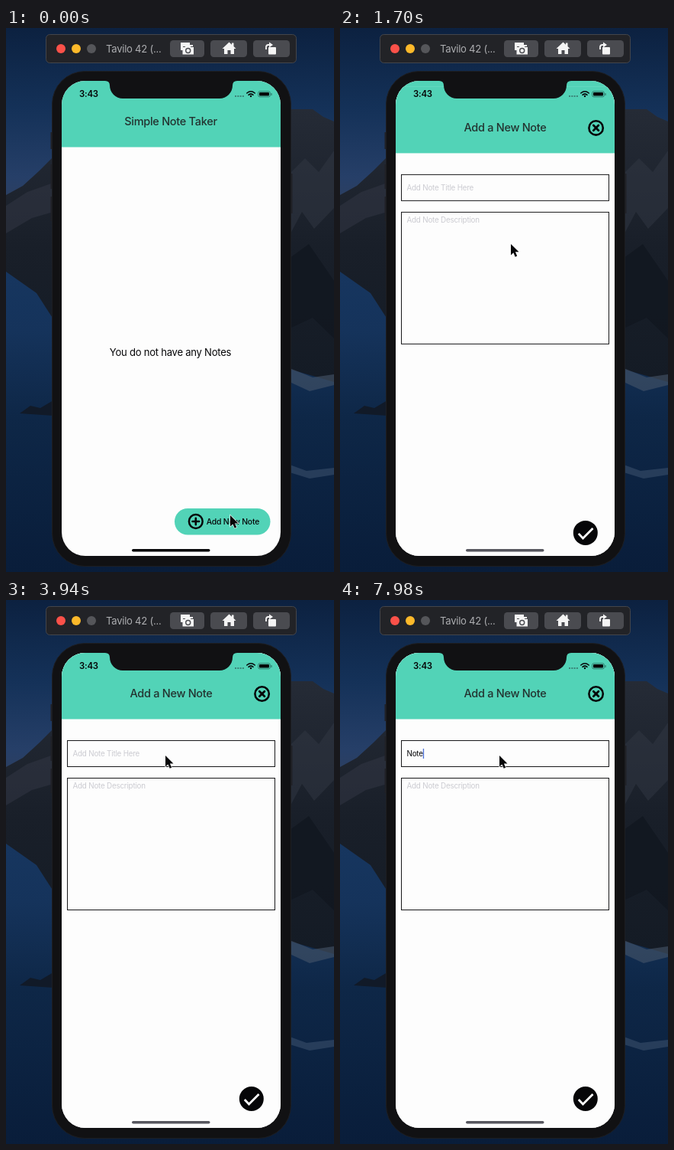
Recreate the animation shown at these times as an HTML page. Size 430 by 710 pixels, loop 8 s.

```html
<!DOCTYPE html>
<html lang="en">
<head>
<meta charset="utf-8">
<title>Simple Note Taker</title>
<style>
  html, body { margin: 0; width: 100%; height: 100%; overflow: hidden; background: #0b1c36; }
  svg { display: block; width: 100vw; height: 100vh; }
  text { font-family: Inter, "Open Sans", sans-serif; letter-spacing: -.02em; fill: #060608; white-space: pre; }
  .teal { fill: #52d3b7; }
  .page { fill: #fdfdfd; }
  .heading { font-size: 14.5px; font-weight: 500; fill: #233330; text-anchor: middle; }
  .field { fill: none; stroke: #18181a; }
  .input { font-size: 9.8px; }
  .hint { fill: #cbcbd1; }
  .bezel { fill: #111113; }
  .key { fill: #4a4b50; }
  .icon { fill: #f4f4f4; }
  .line { fill: none; stroke: #060608; stroke-linecap: round; stroke-linejoin: round; }
</style>
</head>
<body>
<svg viewBox="0 0 430 710">
  <defs>
    <linearGradient id="sky" x2="0" y2="1">
      <stop offset="0" stop-color="#0c2140"/>
      <stop offset=".4" stop-color="#143158"/>
      <stop offset=".75" stop-color="#263f68"/>
      <stop offset="1" stop-color="#333f58"/>
    </linearGradient>
    <linearGradient id="hill" x2="0" y2="1">
      <stop offset="0" stop-color="#252b36"/>
      <stop offset=".5" stop-color="#191f29"/>
      <stop offset="1" stop-color="#141b25"/>
    </linearGradient>
    <linearGradient id="water" x2="0" y2="1">
      <stop offset="0" stop-color="#183862"/>
      <stop offset=".3" stop-color="#15335b"/>
      <stop offset=".55" stop-color="#0e2747"/>
      <stop offset="1" stop-color="#091d3a"/>
    </linearGradient>
    <clipPath id="screen"><rect x="73" y="69" width="287" height="620" rx="31"/></clipPath>
  </defs>

  <!-- Wallpaper -->
  <rect width="430" height="260" fill="url(#sky)"/>
  <rect y="260" width="430" height="450" fill="url(#water)"/>
  <path d="M0 218L22 206 44 186 62 168H365L374 106 402 106 416 116 430 122V462L374 446 62 380 40 346 0 318Z" fill="url(#hill)"/>
  <path d="M0 232L28 214 62 202V240L34 248 0 268Z" fill="#343947" opacity=".5"/>
  <path d="M372 190L392 170 410 188 430 160V235L404 262 388 240 372 270Z" fill="#323845" opacity=".5"/>
  <path d="M372 300L397 282 430 330V405L402 378 372 392Z" fill="#10161f" opacity=".7"/>
  <path d="M372 444L402 456 430 452V466L398 474 372 462Z" fill="#46566a" opacity=".6"/>
  <path d="M372 570L394 578 430 574V583L398 588 372 580Z" fill="#3a4f6b" opacity=".6"/>
  <path d="M18 503L32 493 45 496 62 486V506Z" fill="#111a28"/>

  <!-- Simulator toolbar -->
  <rect x="52.5" y="8.5" width="328" height="37" rx="5" fill="#222327" stroke="#43454b"/>
  <circle cx="72" cy="27" r="6" fill="#fb5149"/>
  <circle cx="92" cy="27" r="6" fill="#fdb92a"/>
  <circle cx="112" cy="27" r="6" fill="#55565a"/>
  <text x="131" y="31.5" font-size="13.1" style="fill:#adaeb1">Tavilo 42 (...</text>
  <rect class="key" x="215" y="16" width="45" height="22" rx="4.5"/>
  <rect class="key" x="268" y="16" width="48" height="22" rx="4.5"/>
  <rect class="key" x="324" y="16" width="48" height="22" rx="4.5"/>
  <path class="icon" d="M229 19H241V22H245V24H232V29H229Z"/>
  <path class="icon" d="M231.5 25H234.5L236 23H241L242.500 25H246V34.500H231.500Z"/>
  <circle cx="238.700" cy="29.500" r="3" fill="none" stroke="#4a4b50" stroke-width="1.400"/>
  <path class="icon" d="M283.500 27L292.500 18.500 296 21.800V19.500H298.500V24L301.500 27H299V34H294.500V29H290.500V34H286V27Z"/>
  <rect class="icon" x="344" y="25" width="10" height="9.500" rx="1"/>
  <path d="M341 28V25Q341 22 344 22H346" fill="none" stroke="#f4f4f4" stroke-width="1.800"/>
  <path class="icon" d="M345 18.500L350 22 345 25.500Z"/>

  <!-- Phone -->
  <path d="M60 136V158M60 178V210M60 220V252M374 190V242" stroke="#202126" stroke-width="3"/>
  <rect x="60.5" y="56.5" width="313" height="646" rx="43" class="bezel" stroke="#1d1e22"/>

  <g clip-path="url(#screen)">
    <rect class="page" x="73" y="69" width="287" height="620"/>
    <rect class="teal" x="73" y="69" width="287" height="86.500"/>
    <text class="heading" x="216" y="127">Simple Note Taker</text>
    <text x="215.500" y="427.500" font-size="13.1" text-anchor="middle">You do not have any Notes</text>
    <rect class="teal" x="221" y="627" width="125.500" height="34.500" rx="17.200"/>
    <circle class="line" cx="248.800" cy="644" r="8.900" stroke-width="2.500"/>
    <path class="line" d="M244.500 644H253.100M248.800 639.700V648.300" stroke-width="2.600"/>
    <text x="262.800" y="647.700" font-size="10.4" font-weight="500">Add New Note</text>

    <g id="sheet">
      <rect class="page" x="73" y="69" width="287" height="640"/>
      <rect class="teal" x="73" y="69" width="287" height="86.500"/>
      <text class="heading" x="216.500" y="127">Add a New Note</text>
      <circle class="line" cx="335.600" cy="122.500" r="9.200" stroke-width="2.600"/>
      <path class="line" d="M332.300 119.200L338.900 125.800M338.900 119.200L332.300 125.800" stroke-width="2.800"/>
      <rect class="field" x="80.5" y="183.500" width="272" height="34"/>
      <rect class="field" x="80.5" y="232.500" width="272" height="172"/>
      <text class="input" id="title" x="87.500" y="204.200"></text>
      <rect id="caret" y="194" width="1.300" height="13" fill="#4a6fd8"/>
      <text class="input hint" x="87.500" y="245.700">Add Note Description</text>
      <circle cx="321.800" cy="651" r="16" fill="#060608"/>
      <path d="M312.800 652L318.500 658 331.500 645" fill="none" stroke="#fdfdfd" stroke-width="2.800"/>
    </g>
  </g>

  <!-- Status bar -->
  <path class="bezel" d="M130 68V69Q136 69 136 75A17 17 0 0 0 153 92H280A17 17 0 0 0 297 75Q297 69 303 69V68Z"/>
  <text x="96" y="90" font-size="11.4" font-weight="600">3:43</text>
  <path d="M300 89H312" stroke="#3b8478" stroke-width="1.800" stroke-dasharray="2 1.300"/>
  <path d="M315.800 85Q321 80.500 326.200 85M318 87.300Q321 84.800 324 87.300" class="line" stroke-width="1.600"/>
  <circle cx="321" cy="89" r="1.200" fill="#060608"/>
  <rect x="330.700" y="82.700" width="15.600" height="7.200" rx="2" fill="none" stroke="#28685c" stroke-width=".8"/>
  <rect x="332" y="84" width="13" height="4.600" rx="1" fill="#060608"/>
  <path d="M348 85V88" stroke="#28685c"/>
  <rect x="165" y="680" width="102.500" height="3.600" rx="1.800" id="homeBar"/>

  <path id="pointer" d="M0 0V14.500L3.400 11.400 5.700 16.800 8.200 15.700 5.900 10.400H10.500Z" fill="#060608" stroke="#fff" stroke-width="1.200" paint-order="stroke"/>
</svg>

<script>
  const LOOP = 8000, SHEET_START = 715, FOCUS = 4400;
  const WORD = "Note", KEY_TIMES = [5900, 6300, 7000, 7500];
  const POINTER_PATH = [ // time, x, y
    [0, 294, 636], [900, 294, 636], [1140, 284, 529], [1700, 224, 282],
    [2260, 220, 239], [2600, 220, 239], [2950, 209, 203], [LOOP, 209, 203]
  ];
  const [sheet, title, caret, pointer, homeBar] =
    ["sheet", "title", "caret", "pointer", "homeBar"].map(id => document.getElementById(id));

  function pointerAt(t) {
    const i = POINTER_PATH.findIndex(p => p[0] > t);
    const [t0, x0, y0] = POINTER_PATH[i - 1], [t1, x1, y1] = POINTER_PATH[i];
    const k = (t - t0) / (t1 - t0);
    return [x0 + (x1 - x0) * k, y0 + (y1 - y0) * k];
  }

  // Critically damped slide from below the screen
  function sheetOffset(t) {
    const s = Math.max(0, t - SHEET_START) * 0.00645;
    const y = 620 * (1 + s) * Math.exp(-s);
    return y < 0.4 ? 0 : y;
  }

  function draw(t) {
    sheet.setAttribute("transform", `translate(0 ${sheetOffset(t)})`);
    pointer.setAttribute("transform", `translate(${pointerAt(t)})`);
    homeBar.setAttribute("fill", t < SHEET_START + 100 ? "#060608" : "#57575f");

    const pressed = KEY_TIMES.filter(k => k <= t);
    const typed = WORD.slice(0, pressed.length);
    title.textContent = typed || "Add Note Title Here";
    title.classList.toggle("hint", !typed);

    const lastAction = pressed.length ? pressed[pressed.length - 1] : FOCUS;
    const visible = t >= FOCUS && (t - lastAction) % 1000 < 500;
    caret.setAttribute("visibility", visible ? "visible" : "hidden");
    caret.setAttribute("x", 87.5 + (typed ? title.getComputedTextLength() : 0));
  }

  function tick() {
    draw(performance.now() % LOOP);
    requestAnimationFrame(tick);
  }
  tick();
</script>
</body>
</html>
```
